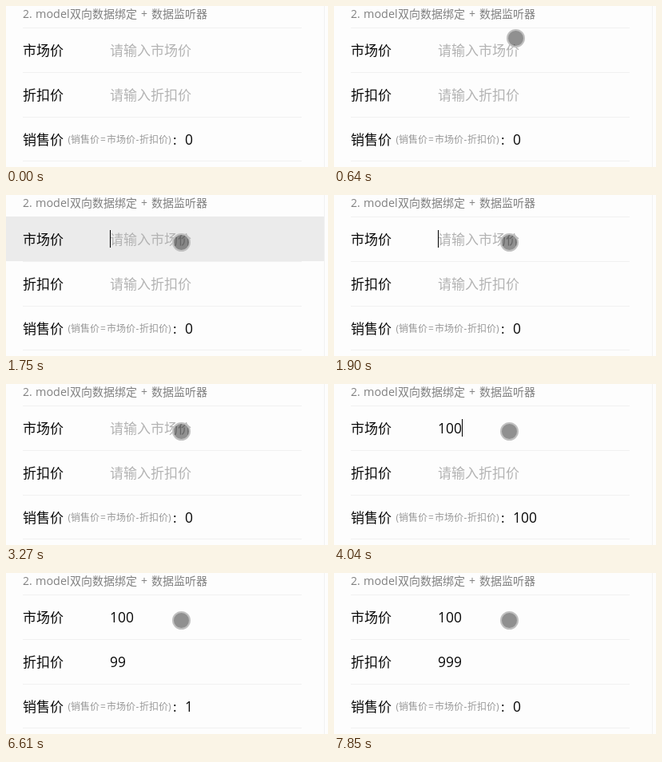
These frames come from a looping animation (403x202 px, 8000 ms). An HTML page:

```html
<!DOCTYPE html>
<html lang="zh-CN">
<head>
<meta charset="utf-8">
<title>双向数据绑定</title>
<style>
html, body { margin: 0; width: 100%; height: 100%; overflow: hidden; background: #fdfdfd; }
svg { display: block; width: 403px; height: 202px; }
text { font-family: "Open Sans", "Noto Sans", "Noto Sans CJK SC", "Noto Sans CJK", sans-serif; fill: #080808; }
.label { font-size: 17px; }
.num { font-size: 17.4px; }
.title { font-size: 14px; fill: #808080; }
.note { font-size: 12px; fill: #999; }
.hint { font-size: 17px; fill: #b3b3b3; }
.line { fill: #f1f1f1; }
</style>
</head>
<body>
<svg viewBox="0 0 403 202">
  <rect width="403" height="202" fill="#fdfdfd"/>
  <rect class="line" x="398" width="1" height="202"/>
  <g id="lines"></g>
  <rect id="press" y="27" width="398" height="56" fill="#ebebeb"/>

  <g class="title">
    <text class="title" x="21" y="15">2.</text>
    <text class="title" x="37" y="15" style="font-size:14.4px">model</text>
    <text class="title" x="80" y="15">双向数据绑定</text>
    <text class="title" x="169" y="15">+</text>
    <text class="title" x="182" y="15">数据监听器</text>
  </g>

  <text class="label" x="21" y="62">市场价</text>
  <text class="label" x="21" y="118">折扣价</text>
  <text class="label" x="21" y="174">销售价</text>
  <text class="note" x="77.5" y="172">(</text>
  <text class="note" x="81" y="172">销售价</text>
  <text class="note" x="118" y="172">=</text>
  <text class="note" x="126" y="172">市场价</text>
  <text class="note" x="162.5" y="172">-</text>
  <text class="note" x="167" y="172">折扣价</text>
  <text class="note" x="203" y="172">)</text>
  <text class="label" x="209" y="174">:</text>

  <text class="hint" id="hint0" x="130" y="62">请输入市场价</text>
  <text class="hint" id="hint1" x="130" y="118">请输入折扣价</text>
  <text class="num" id="field0" x="130" y="62"></text>
  <text class="num" id="field1" x="130" y="118"></text>
  <text class="num" id="total" x="224" y="174">0</text>

  <rect id="caret" width="1" height="22" fill="#000"/>
  <g id="pointer">
    <circle r="10.5" fill="#000" fill-opacity=".43"/>
    <circle r="10.5" fill="none" stroke="#c0c0c0" stroke-width="2"/>
  </g>
</svg>
<script>
const LOOP = 8000;
const $ = id => document.getElementById(id);

// Each track lists [start time, value]; values hold until the next entry.
const market = [[0, ''], [3520, '1'], [3920, '10'], [4040, '100']];
const discount = [[0, ''], [5780, '9'], [6060, '99'], [7290, '999']];
const focus = [[0, 0], [4880, 1]];
const pressed = [[0, false], [1750, true], [1900, false]];
const caretOn = [[0, false], [1750, true], [2180, false], [2740, true], [3270, false],
  [3520, true], [4600, false], [4880, true], [5380, false], [5780, true],
  [6610, false], [7170, true], [7850, false]];
const pointer = [[0, null], [520, [228, 36]], [640, [227.5, 40.5]],
  [790, [222.5, 53]], [910, [219.5, 59.5]]];

function at(track, t) {
  let value;
  for (const [start, v] of track) if (t >= start) value = v;
  return value;
}

function show(el, on) {
  el.setAttribute('visibility', on ? 'visible' : 'hidden');
}

for (const y of [27, 83, 139, 194]) {
  const line = document.createElementNS('http://www.w3.org/2000/svg', 'rect');
  line.setAttribute('class', 'line');
  line.setAttribute('x', 21);
  line.setAttribute('y', y);
  line.setAttribute('width', 349);
  line.setAttribute('height', 1);
  $('lines').append(line);
}

function draw(t) {
  const values = [at(market, t), at(discount, t)];
  values.forEach((v, i) => {
    $('field' + i).textContent = v;
    show($('hint' + i), !v);
  });
  $('total').textContent = Math.max(0, values[0] - values[1]);

  const row = at(focus, t);
  $('caret').setAttribute('x', 130 + 10 * values[row].length);
  $('caret').setAttribute('y', 44 + 56 * row);
  show($('caret'), at(caretOn, t));
  show($('press'), at(pressed, t));

  const pos = at(pointer, t);
  show($('pointer'), pos);
  if (pos) $('pointer').setAttribute('transform', `translate(${pos})`);
}

const origin = performance.now();
function tick() {
  draw((performance.now() - origin) % LOOP);
  requestAnimationFrame(tick);
}
tick();
</script>
</body>
</html>
```
